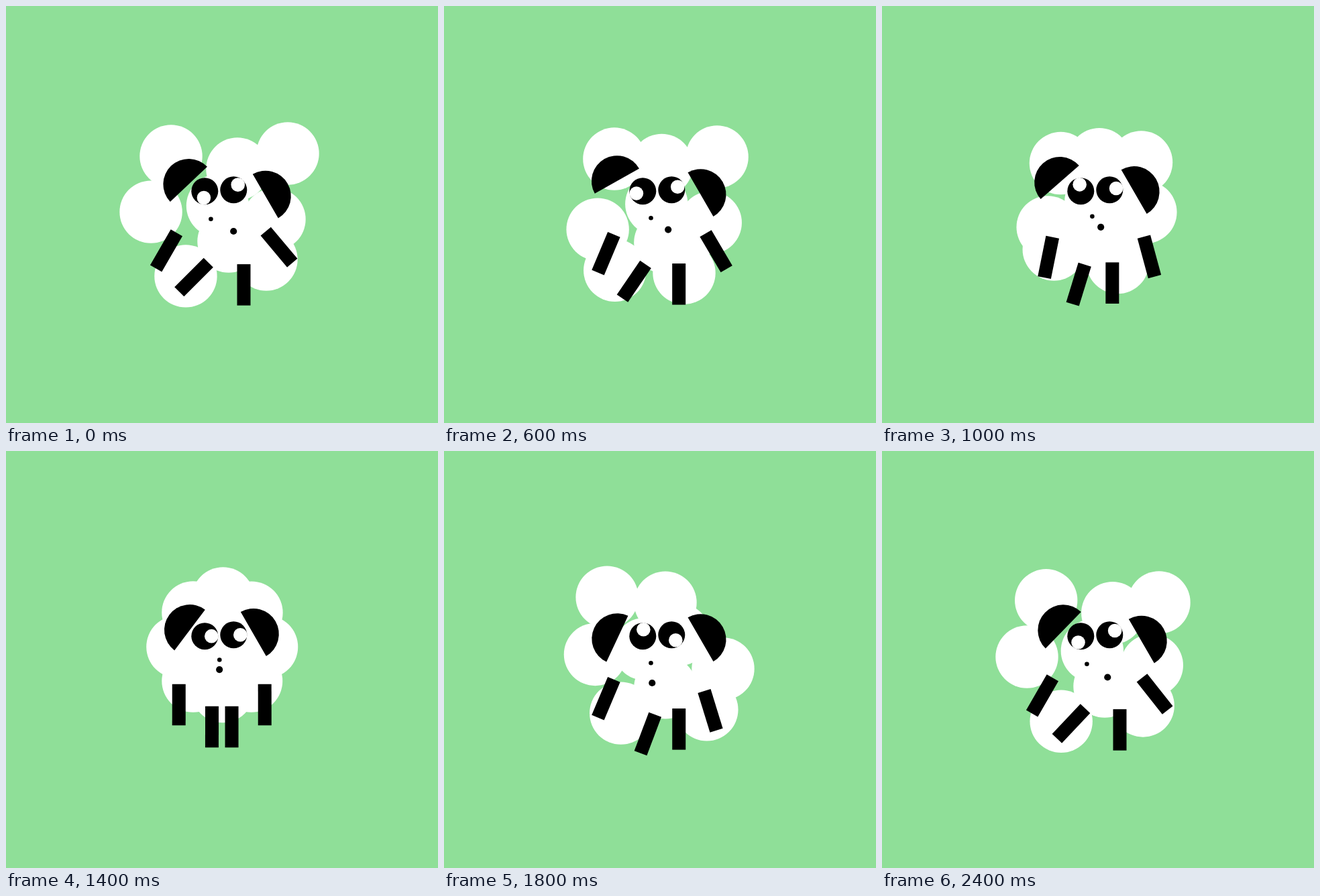
Animation, 644 px wide and 622 px high, one loop 2450 ms. Source, as an HTML page with a canvas:

```html
<!DOCTYPE html>
<html lang="en">
<head>
<meta charset="utf-8">
<title>Sheep</title>
<style>
  html, body { margin: 0; width: 100%; height: 100%; overflow: hidden; background: #8fdf98; }
  canvas { display: block; }
</style>
</head>
<body>
<canvas width="644" height="622"></canvas>
<script>
const ctx = document.querySelector('canvas').getContext('2d');
const BEAT = 350;
const rad = deg => deg * Math.PI / 180;
const mix = (a, b, k) => a.map((v, i) => v + (b[i] - v) * k);
const parts = [];

// Every part drifts from apart to ready, gathers at home, bursts and returns.
// Times are in beats; most parts wait and burst at the place where they start.
function addPart(draw, home, apart, { ready = apart, burst = apart, via = [] } = {}) {
  const detours = via.map((pose, i) => [2.1 + i * 0.97, pose]);
  const stops = [[0, apart], [1, ready], ...detours, [4, home], [5.5, burst], [7, apart]];
  parts.push(beat => {
    const next = stops.findIndex(([time]) => time > beat);
    const [t0, from] = stops[next - 1], [t1, to] = stops[next];
    draw(...mix(from, to, (beat - t0) / (t1 - t0)));
  });
}

function fillArc(color, x, y, r, from = 0, to = 360) {
  ctx.fillStyle = color;
  ctx.beginPath();
  ctx.arc(x, y, r, rad(from), rad(to));
  ctx.fill();
}

const dot = (color, r, ...path) => addPart((x, y) => fillArc(color, x, y, r), ...path);
const wool = (...path) => dot('#fff', 46.7, ...path);

// Ears and legs shift and turn around the middle of the stage.
const limb = (draw, ...path) => addPart((x, y, angle) => {
  ctx.save();
  ctx.translate(322 + x, 311 + y);
  ctx.rotate(rad(angle));
  draw();
  ctx.restore();
}, [0, 0, 0], ...path);

const leg = (x, y, ...path) => limb(() => {
  ctx.fillStyle = '#000';
  ctx.fillRect(x - 10, y - 30.75, 20, 61.5);
}, ...path);

const ear = (x, y, tilt, ...path) =>
  limb(() => fillArc('#000', x, y, 38, tilt - 180, tilt), ...path);

const eye = (x, y, ...path) => addPart(angle => {
  fillArc('#000', x, y, 20);
  fillArc('#fff', x + 10 * Math.cos(rad(angle)), y + 10 * Math.sin(rad(angle)), 10.3);
}, ...path);

wool([279, 241], [246, 224], { burst: [232, 211] });
wool([323.5, 220], [345, 243], { ready: [325, 243], burst: [332, 228] });
wool([366, 241], [420, 220], { burst: [345, 284] });
wool([256, 292], [216, 307], { ready: [235, 354], via: [[226, 322], [253, 332]] });
wool([388.5, 292], [400, 318], { ready: [400, 333], burst: [424.5, 335] });
wool([279, 343], [268, 403], { ready: [250.5, 365], burst: [259, 406], via: [[257, 410], [256, 350]] });
wool([323, 358.5], [332, 351]);
wool([365.5, 343], [388, 378], { burst: [400, 399], via: [[342, 409]] });
wool([321, 287], [315.5, 298], { burst: [292.5, 298] });

leg(-64.2, 67.5, [6.3, 27.6, 30]);
leg(-15, 100.5, [39.7, 33, 45], { burst: [41, 29, 27] });
leg(14.5, 100.5, [18, 4.4, 0]);
leg(63.7, 67.5, [-7.2, 37.9, -40], { burst: [-7.5, 40, -22.4] });

ear(-48, -44, -53, [-9.5, 6.3, 9.5], { ready: [-49.6, 12.8, 31], burst: [-10, 3, -15.6] });
ear(46.8, -38, 60, [18, 10.7, 0]);

eye(296.3, 276.2, [360], [98], { burst: [250] });
eye(339.3, 274.3, [0], [-50], { ready: [-35], burst: [69.5] });

dot('#000', 3.3, [318.3, 311.5], [305.4, 317.7]);
dot('#000', 5.1, [318.2, 326], [339.2, 336], { burst: [307.8, 352.2] });

function loop() {
  ctx.clearRect(0, 0, 644, 622);
  const beat = performance.now() / BEAT % 7;
  parts.forEach(draw => draw(beat));
  requestAnimationFrame(loop);
}
loop();
</script>
</body>
</html>
```
